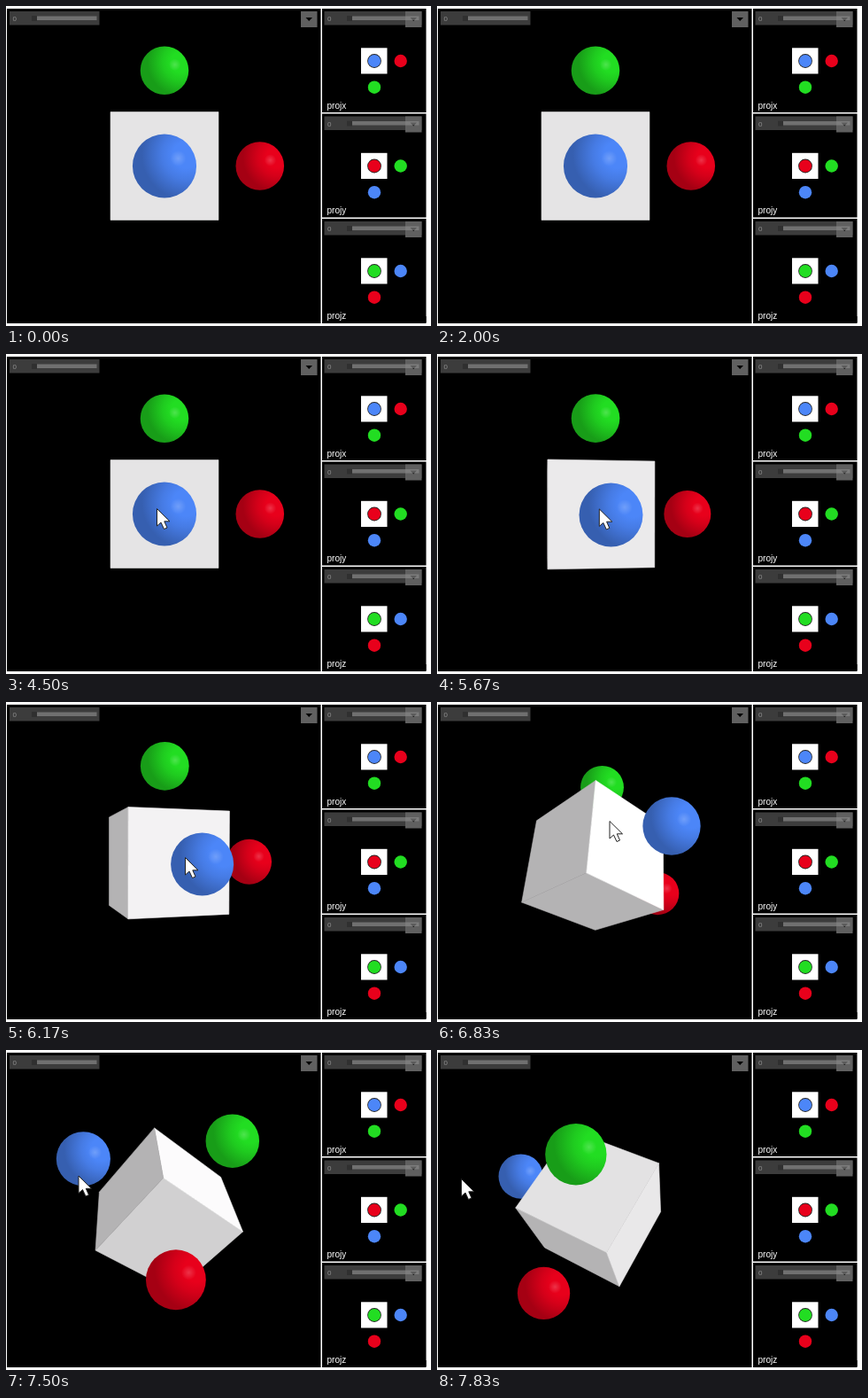
An HTML page with a canvas that plays this animation: 480 by 361 pixels, repeating every 8 s.

```html
<!DOCTYPE html>
<html>
<head>
<meta charset="utf-8">
<style>
html, body { margin: 0; width: 100%; height: 100%; overflow: hidden; background: #fff; }
canvas { display: block; }
</style>
</head>
<body>
<canvas id="stage" width="480" height="361"></canvas>
<script>
const ctx = document.getElementById('stage').getContext('2d');
const LOOP = 8000, FPS = 6;
const FOCAL = 445, CAMERA = 8.3, CX = 179, CY = 180.5;
const ORBIT = 2.01, RADIUS = .508;
const LIGHT = [.58, .29, .53];
const RED = [232, 0, 27], GREEN = [34, 221, 34], BLUE = [76, 134, 248];

// Drag keys: step, pointer position, orientation quaternion (w, x, y, z)
const KEYS = [
  { at: 18, tip: [-16, 20], q: [1, 0, 0, 0] },
  { at: 25, tip: [170.5, 174.5], q: [1, 0, 0, 0] },
  { at: 32, tip: [170.5, 174.5], q: [1, 0, 0, 0] },
  { at: 37, tip: [202.5, 175.5], q: [.988, .009, .154, 0] },
  { at: 41, tip: [195, 134.5], q: [.907, -.22, .338, -.125] },
  { at: 45, tip: [82, 142], q: [.7395, -.026, -.5275, -.416] },
  { at: 47, tip: [27.5, 145.5], q: [.387, .316, -.76, -.412] }
];

const rgb = (c, k = 1) => `rgb(${c.map(v => Math.min(255, Math.round(v * k)))})`;
const dot = (a, b) => a.reduce((sum, v, i) => sum + v * b[i], 0);
const mix = (a, b, u, v) => a.map((x, i) => x * u + b[i] * v);
const project = ([x, y, z]) => [CX + FOCAL * x / (CAMERA - z), CY - FOCAL * y / (CAMERA - z)];

function slerp(a, b, k) {
  const angle = Math.acos(Math.min(1, dot(a, b)));
  if (angle < 1e-3) return a;
  return mix(a, b, Math.sin((1 - k) * angle) / Math.sin(angle), Math.sin(k * angle) / Math.sin(angle));
}

function axes(q) {
  const n = Math.hypot(...q), [w, x, y, z] = q.map(v => v / n);
  return [
    [1 - 2 * (y * y + z * z), 2 * (x * y + w * z), 2 * (x * z - w * y)],
    [2 * (x * y - w * z), 1 - 2 * (x * x + z * z), 2 * (y * z + w * x)],
    [2 * (x * z + w * y), 2 * (y * z - w * x), 1 - 2 * (x * x + y * y)]
  ];
}

function poseAt(step) {
  let i = 0;
  while (i < KEYS.length - 2 && step >= KEYS[i + 1].at) i++;
  const a = KEYS[i], b = KEYS[i + 1];
  const k = Math.max(0, Math.min(1, (step - a.at) / (b.at - a.at)));
  return { tip: mix(a.tip, b.tip, 1 - k, k), q: slerp(a.q, b.q, k) };
}

function box(x, y, w, h, color) {
  ctx.fillStyle = color;
  ctx.fillRect(x, y, w, h);
}

function disc(x, y, r, fill) {
  ctx.fillStyle = fill;
  ctx.beginPath();
  ctx.arc(x, y, r, 0, 7);
  ctx.fill();
}

function polygon(points, fill, line) {
  ctx.fillStyle = fill;
  ctx.beginPath();
  points.forEach(p => ctx.lineTo(...p));
  ctx.closePath();
  ctx.fill();
  if (!line) return;
  ctx.strokeStyle = line;
  ctx.stroke();
}

function label(text, x, y, size, color) {
  ctx.fillStyle = color;
  ctx.font = `${size}px "Liberation Sans", Arial, sans-serif`;
  ctx.fillText(text, x, y);
}

function radial(x, y, r, stops) {
  const g = ctx.createRadialGradient(x, y, 0, x, y, r);
  stops.forEach(s => g.addColorStop(...s));
  return g;
}

function sphere({ pos, color }) {
  const [x, y] = project(pos);
  const r = FOCAL * RADIUS / Math.sqrt((CAMERA - pos[2]) ** 2 - RADIUS ** 2);
  disc(x, y, r, radial(x + .69 * r, y - .35 * r, 1.4 * r,
    [[0, rgb(color)], [.3, rgb(color)], [.55, rgb(color, .92)], [1, rgb(color, .71)]]));
  const hx = x + .43 * r, hy = y - .24 * r;
  disc(hx, hy, .25 * r, radial(hx, hy, .25 * r,
    [[0, 'rgba(255,255,255,.2)'], [1, 'rgba(255,255,255,0)']]));
}

const facing = n => n[2] * CAMERA > 1;

function cube(ax) {
  ctx.lineWidth = .6;
  ctx.lineJoin = 'round';
  ax.forEach((axis, i) => [1, -1].forEach(side => {
    const n = axis.map(v => v * side);
    if (!facing(n)) return;
    const u = ax[(i + 1) % 3], v = ax[(i + 2) % 3];
    const corners = [[1, 1], [1, -1], [-1, -1], [-1, 1]]
      .map(([a, b]) => project(mix(n, mix(u, v, a, b), 1, 1)));
    const shade = 180 + 93 * Math.max(0, dot(n, LIGHT));
    const color = rgb([shade, shade - 1, shade]);
    polygon(corners, color, color);
  }));
}

function scene(q) {
  const ax = axes(q);
  const balls = [RED, GREEN, BLUE]
    .map((color, i) => ({ color, pos: ax[i].map(v => ORBIT * v), front: facing(ax[i]) }))
    .sort((a, b) => a.pos[2] - b.pos[2]);
  balls.filter(b => !b.front).forEach(sphere);
  cube(ax);
  balls.filter(b => b.front).forEach(sphere);
}

function controls(x, y, w, menuX, trackX) {
  box(x, y, w, 15.5, '#3c3c3c');
  label('0', x + 3.5, y + 11, 8, '#8c8c8c');
  box(menuX, y, 18.5, 18, '#606060');
  polygon([[menuX + 5.5, y + 7], [menuX + 13, y + 7], [menuX + 9.2, y + 11]], '#000');
  box(trackX, y + 5.5, x + w - 3 - trackX, 4.5, 'rgba(140,140,140,.65)');
  box(trackX - 3, y + 5, 6, 6, '#303030');
}

function inset(name, y, colors) {
  box(357, y + 3, 117.5, 117, '#000');
  controls(359.5, y + 6, 110, 451, 388);
  box(401, y + 47.3, 29.5, 29.2, '#fff');
  disc(416, y + 62, 7.9, '#222');
  disc(416, y + 62, 7.1, rgb(colors[0]));
  disc(445.7, y + 62, 7.2, rgb(colors[1]));
  disc(416, y + 91.7, 7.2, rgb(colors[2]));
  label(name, 362.5, y + 115.5, 10, '#fff');
}

function pointer([x, y]) {
  const shape = [[0, 0], [0, 19.5], [4.5, 15.5], [8, 23], [11.5, 21.5], [8.3, 14.3], [14.5, 14.3]];
  ctx.lineWidth = 1;
  polygon(shape.map(p => [p[0] + x, p[1] + y]), '#fff', '#222');
}

function draw(now) {
  const step = Math.floor((now % LOOP + 4) * FPS / 1000);
  const pose = poseAt(Math.min(step, LOOP * FPS / 1000 - 1));
  box(0, 0, 480, 361, '#fff');
  box(1, 3, 354.5, 355, '#000');
  box(357, 350, 117.5, 8, '#000');
  inset('projx', 0, [BLUE, RED, GREEN]);
  inset('projy', 118.5, [RED, GREEN, BLUE]);
  inset('projz', 237, [GREEN, BLUE, RED]);
  ctx.save();
  ctx.beginPath();
  ctx.rect(1, 3, 354.5, 355);
  ctx.clip();
  scene(pose.q);
  controls(4, 6, 101.5, 333, 32);
  pointer(pose.tip);
  ctx.restore();
}

const start = performance.now();
function tick() {
  draw(performance.now() - start);
  requestAnimationFrame(tick);
}
tick();
</script>
</body>
</html>
```
